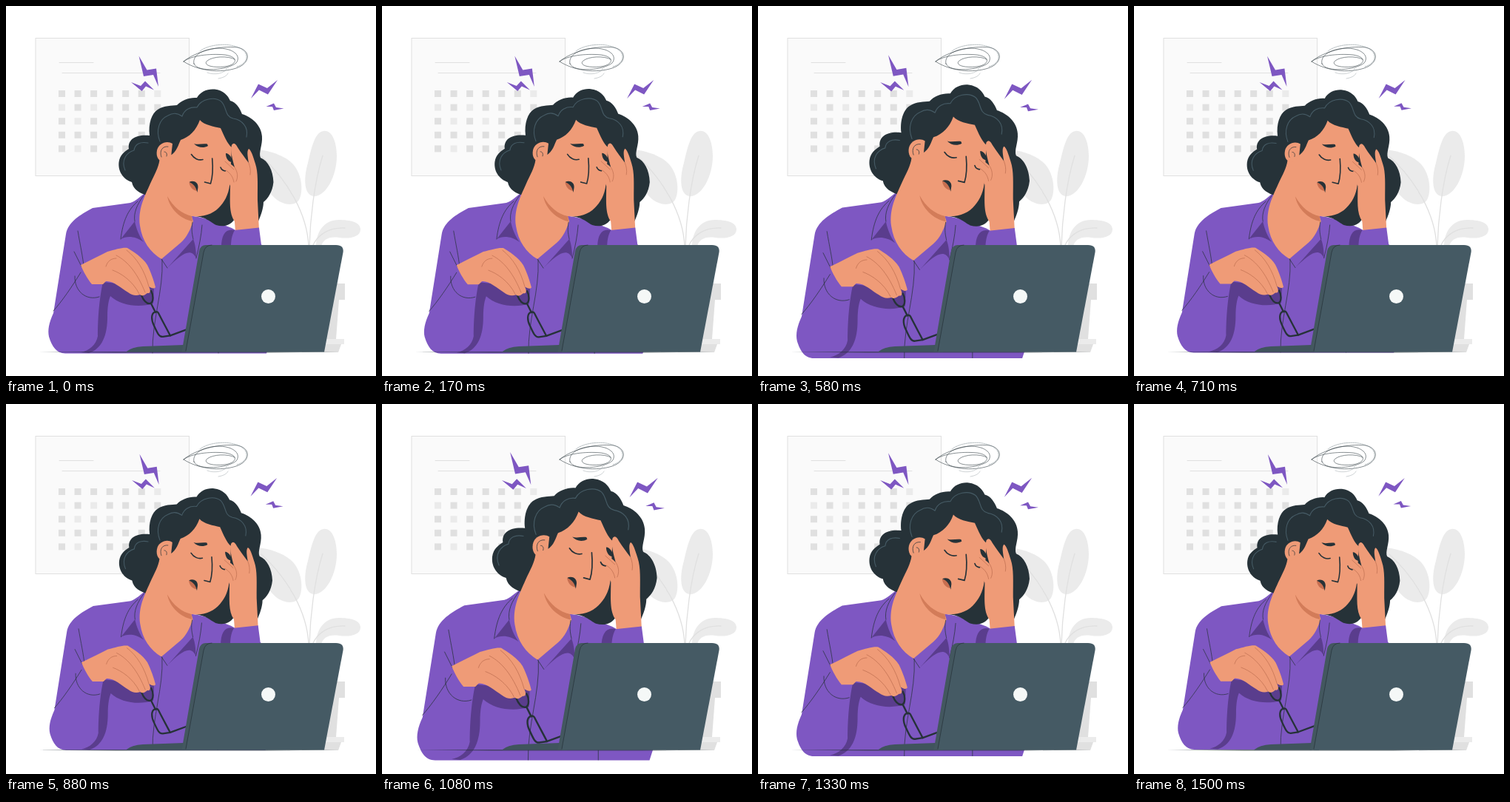
These frames come from a looping animation (500 px wide and 500 px high, 1.54 s). An HTML page:

```html
<!DOCTYPE html>
<html lang="en">
<head>
<meta charset="utf-8">
<title>Tired at the laptop</title>
<style>
html, body { margin: 0; width: 100%; height: 100%; overflow: hidden; background: #fff }
svg { display: block; width: 100vw; height: 100vh }
.line { fill: none; stroke-linecap: round; stroke-linejoin: round }
.ink { stroke: #263238 }
.thin { stroke-width: .7 }
.purple { fill: #7e57c2 }
.shade { fill: #5a3d8d }
.hair { fill: #263238 }
.skin { fill: #ef9b77 }
.fold { stroke: #b5674a; stroke-width: .6 }
.pale { fill: #ebebeb }
.grey { fill: #e0e0e0 }
</style>
</head>
<body>
<svg viewBox="0 0 500 500">
  <g id="calendar">
    <rect x="40" y="43.5" width="207.5" height="186" fill="#fafafa" stroke="#e0e0e0"/>
    <path class="line" stroke="#e0e0e0" d="M72 76.500H118M76 90.500H208"/>
  </g>

  <g id="plant">
    <path class="pale" d="M335 194C352 194 377 201 389 215C400 229 402 250 396 262C390 271 375 269 365 261C350 248 338 225 335 194Z"/>
    <path class="pale" d="M429 169C441 167 447 185 447 203C447 230 432 257 417 257C402 257 402 232 408 212C413 190 418 170 429 169Z"/>
    <path class="pale" d="M419 325C419 305 430 289 450 289C465 289 479 292 479 302C479 312 465 315 450 313C436 311 428 316 426 325Z"/>
    <path class="line" stroke="#e0e0e0" stroke-width="1.3" d="M345 203C380 235 407 280 409 325M428 202C416 240 411 290 410 325M414 325C421 309 436 299 458 300"/>
    <path class="grey" d="M400 375H458V397H450L446 450H400Z"/>
    <path class="pale" d="M400 450H457V457H400Z"/>
    <path class="grey" d="M400 457H453L449 468H400Z"/>
  </g>

  <g id="scribble" class="line ink" stroke-width=".55">
    <path d="M240 75C255 62 288 53 313 56C332 60 330 78 311 84C290 91 260 88 240 75"/>
    <path d="M254 78C251 66 268 57 289 57C309 58 318 68 311 77C301 86 259 91 254 78Z"/>
    <path d="M240 75C250 67 275 64 296 66C316 69 312 80 295 82C276 84 266 79 272 74C279 68 300 67 309 72"/>
    <path stroke="#78868c" stroke-dasharray="2 1" d="M262 61C275 51 303 49 318 58C330 66 326 78 312 82"/>
    <path stroke="#a5adb1" d="M272 90C282 94 296 91 299 84M287 98C293 97 298 95 300 91"/>
  </g>

  <g id="bolts" class="purple">
    <path d="M179.500 67.500L190.500 86.500L203 84.500L206 109L199 93L186 95Z"/>
    <path d="M169 103L182 108L188 101.500L200 113.500L189 108.500L183.500 115Z"/>
    <path d="M367 100L354 119.500L342 113.500L331 125L341 105.500L353 111Z"/>
    <path d="M351.500 136L362 131.500L365 137L375.500 138.500L362 141L360 136Z"/>
  </g>

  <g id="woman">
    <path class="purple" d="M190 251C182 257 175 264 168 266L117 273C100 282 84 292 81 308L64 415C58 428 56 438 58 447C62 460 68 469.500 80 469.500H352L357 454L346 323L305 300C290 294 270 286 253 284Z"/>
    <path class="hair" d="M190 256C182 253 172 249 170 238C160 235 151 225 152.500 211C154 201 160 197 166 193C164 180 176 173 194 175C192 159 197 145 205 140C214 134 224 135 231 134C237 127 249 123 258 124C263 115 273 111.500 282 112.500C294 114 300 121 303 128C311 130 316 138 319 146C332 150 345 161 346 176C347 188 341 198 344 205C354 209 361 222 361.500 238C360 252 354 260 348 265C348 274 344 284 341 291L309 288C303 297 294 299 284 296C276 292 272 286 256 284Z"/>
    <g class="line" stroke="#455a64" stroke-width="1.1">
      <path d="M161 222C155 208 163 198 173 195C174 186 182 183 192 185"/>
      <path d="M208 183C202 168 207 153 219 148C227 143 234 146 238 149C241 140 249 136 258 137C264 125 282 122 291 129C299 137 295 149 307 152C319 154 328 163 325 177"/>
    </g>

    <path class="skin" d="M211 208L222 202C231 197 233 187 236 181C248 177 257 168 262 154C268 161 281 163 290 165C295 176 299 186 305 191L303 235C302 252 297 262 290 270C282 280 268 286 251 284L253 291C249 302 245 312 236 320L210 342C195 333 184 318 181 297C178 275 187 258 194.500 241C201 227 206 219 207.500 208Z"/>
    <path class="skin" d="M225 186C218 181 206 185 204 195C202 205 208 212 215 210L223 204Z"/>
    <path class="line ink thin" d="M219 190C211 189 207 196 210 204M214 197C217 197 218 200 217 203"/>
    <path fill="#d37c59" d="M218 257C221 274 236 288 252 291L251 284C238 281 226 272 218 257Z"/>

    <path class="hair" d="M254 186C260 188 266 185.500 272 186.500L273 189C267 192.500 259 191.500 254 186ZM297 199C302 199 306 206 306 211C300 211 297 205 297 199Z"/>
    <path class="line ink" stroke-width="1.6" d="M250.500 200.500C254 206 260 209 266 207.500M290 218C291 221 294 223 298 223M278.700 206C280 220 279 232 276.500 240L268.500 238"/>
    <path fill="#c86f50" d="M247.500 239C250 236 257 237 258 243V250C253 249 249 246 247.500 239Z"/>
    <path class="hair" d="M247.500 238C253 235 260 238 259.500 245L258.500 252C257 245 254 240.500 247.500 238Z"/>

    <path class="shade" d="M155 315L174 291C176 301 180 311 186 319C173 310 163 311 155 315ZM218 354L253 315C256 322 257 332 257 341C250 325 236 336 218 354Z"/>
    <g class="line ink thin">
      <path d="M178 264C165 275 158 290 155 315M186 256C177 268 172 280 174 291M210 342L218 354"/>
      <path d="M252 292C250 303 252 310 253 315M265 296C264 310 261 325 257 341"/>
      <path d="M211 343C213 385 197 425 198 469M287 450V469"/>
      <path d="M97 304C100 322 104 340 105 352M92 332L102 352M101 360C90 378 75 400 64 412M93 365C92 385 108 399 126 393"/>
    </g>

    <path class="skin" d="M310 304L309 291C301 280 303 262 303 243C300 236 296 227 297 222C292 217 292 211 296 210C302 212 306 215 309 218C306 207 303 196 305 188C308 183 311 187 313 191C318 199 323 205 328 212C327 205 325 196 328 193C331 194 334 203 337 213C341 225 340 240 340 262L342 302Z"/>
    <path class="line fold" d="M309 218C313 224 314 231 311 237M297 222C304 226 307 232 308 238M328 212C330 217 331 222 330 228M296 210L308 221"/>
    <path class="purple" d="M291 330C291 310 297 301 309 303L342 299.500L346 330Z"/>
    <path class="shade" d="M291 326C291 309 297 300 309 303C305 310 304 318 304 326Z"/>

    <path class="shade" d="M131 373C125 400 124 430 124 446C122 458 112 466 101 468L112 469C130 463 137 445 137 420C137 405 139 397 141 392C155 405 180 408 199 402L200 380Z"/>
    <g class="line ink" stroke-width="2.300">
      <path d="M183 391C186 398 190 403 195 402C200 400 199 390 196 385M196 402L202 414"/>
      <path d="M201 413.500C196 416 196 424 200 432C205 443 207 447.500 212 447L222 445.500C216 434 210 423 206 415C205 413 203 413 201 413.500Z"/>
      <path d="M222 445.500L245 437"/>
    </g>
    <path class="skin" d="M101 350C115 343 127 337 137 332C148 329 158 326 164 327C172 332 185 340 191 350C196 360 200 372 202 380C200 383 196 381 193 379C196 385 195 389 191 388C188 390 185 393 181 390C176 392 170 391 165 387C155 381 145 371 135 372L131 376H116C110 369 104 358 101 350Z"/>
    <path class="line fold" d="M163 330C177 341 187 357 193 379M149 337C165 345 178 362 188 387M135 352C137 345 142 341 149 341M144 357C155 361 171 371 180 389"/>
  </g>

  <path d="M44 467.600L150 467H350L449 467.600L350 468.400H150Z" fill="#263238" opacity=".65"/>

  <g id="laptop">
    <path fill="#40545d" d="M162 467.500Q170 460.500 185 460L240 458V467.500Z"/>
    <path fill="#43575f" d="M237.500 467.500L261 331Q263 323 270 323H290L250 467.500Z"/>
    <path fill="#455a64" d="M243 467.500L267 333Q269 323 278 323H446Q457 323 455.500 333L430 467.500Z"/>
    <path class="line ink thin" d="M243 466L267 333Q269 323 278 323"/>
    <circle cx="354.500" cy="392.500" r="9.500" fill="#f5f8f7"/>
  </g>
</svg>
<script>
const LOOP = 1540;
const FRAME = 1000 / 24;
const byId = id => document.getElementById(id);

// Day squares: 7 columns by 5 rows, a few of them paler
const paleDays = [6, 7, 9, 15, 17, 29];
let days = '';
for (let i = 0; i < 35; i++) {
  const x = 71 + (i % 7) * 21.55, y = 114 + Math.floor(i / 7) * 18.6;
  days += `<rect class="${paleDays.includes(i) ? 'pale' : 'grey'}" x="${x}" y="${y}" width="9" height="9"/>`;
}
byId('calendar').insertAdjacentHTML('beforeend', days);

// Phase of the pulse in degrees: [tick, angle]
const phases = [[0, -47], [8, 142], [14, 272], [21, 387], [26, 485], [32, 632], [36, 700], [37, 720]];

function pulse(ms) {
  const tick = ms / FRAME;
  const i = Math.max(1, phases.findIndex(p => p[0] > tick));
  const [t0, a0] = phases[i - 1], [t1, a1] = phases[i];
  const angle = a0 + (a1 - a0) * (tick - t0) / (t1 - t0);
  return (1 - Math.cos(angle * Math.PI / 180)) / 2;
}

function scaleAbout(id, x, y, s) {
  byId(id).setAttribute('transform', `translate(${x} ${y}) scale(${s}) translate(${-x} ${-y})`);
}

function draw() {
  const s = 1 + 0.105 * (pulse(performance.now() % LOOP) - 0.159);
  scaleAbout('woman', 206, 285, s);
  scaleAbout('bolts', 278, 104, s);
  requestAnimationFrame(draw);
}
draw();
</script>
</body>
</html>
```
